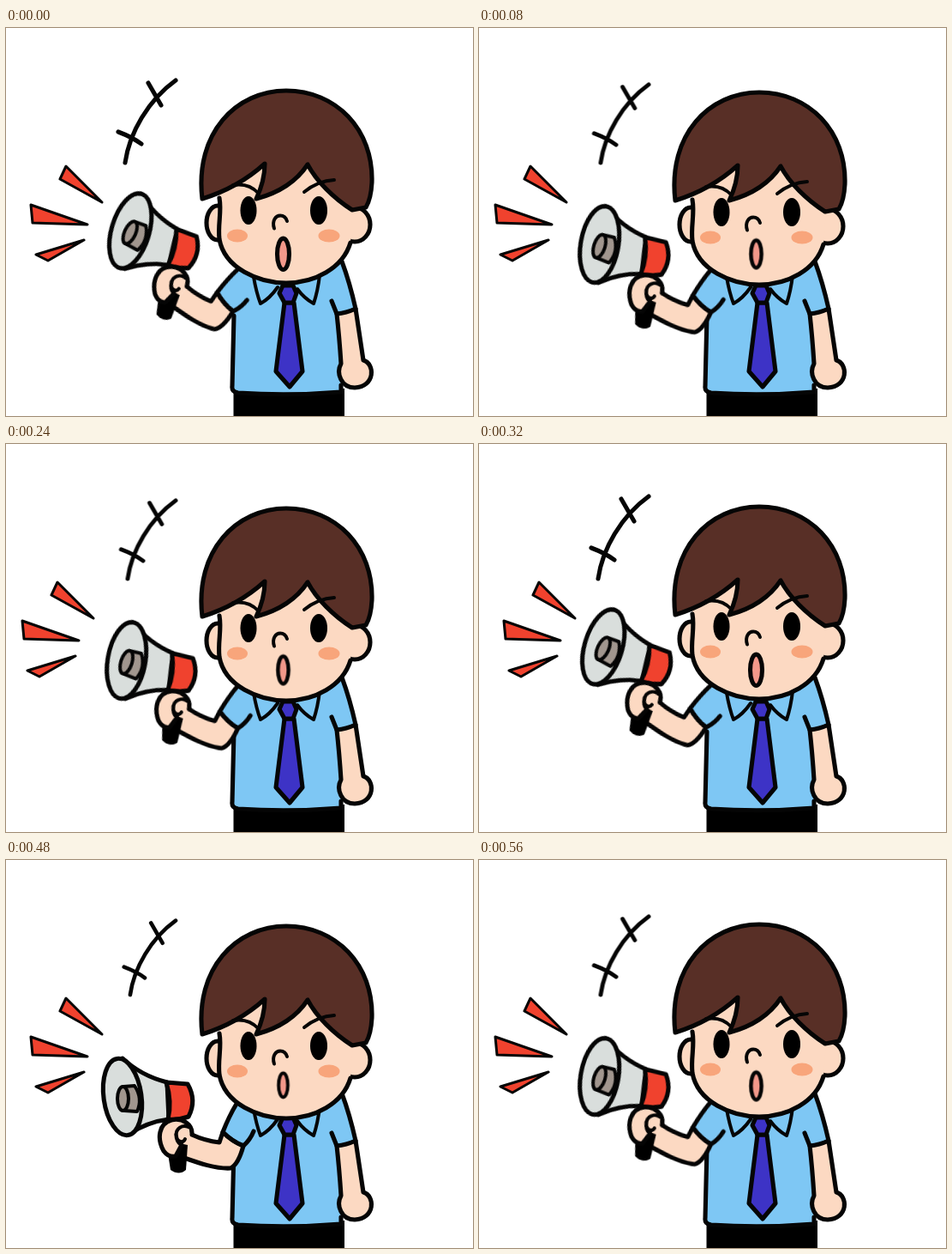
Recreate the animation shown at these times as an HTML page. Size 545x452 px, loop 640 ms.

```html
<!DOCTYPE html>
<html lang="en">
<head>
<meta charset="utf-8">
<title>Megaphone call</title>
<style>
  html, body { margin: 0; width: 100%; height: 100%; overflow: hidden; background: #fff; }
  svg { display: block; width: 545px; height: 452px; }

  .line { fill: none; stroke: #050505; stroke-width: 5.1; stroke-linecap: round; stroke-linejoin: round; }
  .thin { stroke-width: 4; }
  .fine { stroke-width: 3; }
  .skin { fill: #fcd9c2; }
  .shirt { fill: #7ec7f4; }
  .tie { fill: #3d33c6; }
  .hair { fill: #582f26; }
  .red { fill: #f0422e; }
  .horn { fill: #d9dedc; }
  .mic { fill: #a1968e; }
  .cheek { fill: #f8a57b; }
  .lips { fill: #f2988a; }

  /* Four hard-cut poses: high, middle, low, middle */
  .head, .arm, .rim, .mouth, .swoosh { animation: 320ms step-end infinite; }
  .head { animation-name: nod; }
  .arm { animation-name: swing; transform-origin: 279px 296.5px; }
  .rim { animation-name: tilt; transform-origin: 136px 276px; }
  .mouth { animation-name: shout; transform-origin: 323.5px 263px; }
  .swoosh { animation-name: shrink; transform-origin: 198px 157px; }
  .rays { animation: jump 160ms step-end infinite; }

  @keyframes nod {
    0% { transform: translateY(0); }
    25%, 75% { transform: translateY(2px); }
    50% { transform: translateY(4px); }
  }
  @keyframes swing {
    0% { transform: translate(-2px, -1px) rotate(16deg); }
    25%, 75% { transform: translate(-.5px, -1px) rotate(9.3deg); }
    50% { transform: rotate(0deg); }
  }
  @keyframes tilt {
    0%, 25%, 75% { transform: rotate(8.5deg); }
    50% { transform: rotate(0deg); }
  }
  @keyframes shout {
    0% { transform: scale(1); }
    25%, 75% { transform: scale(.88); }
    50% { transform: translateY(-1px) scale(.77); }
  }
  @keyframes shrink {
    0% { transform: scale(1); }
    25%, 75% { transform: scale(.95); }
    50% { transform: scale(.9); }
  }
  @keyframes jump {
    0% { transform: translateX(0); }
    50% { transform: translateX(-10px); }
  }
</style>
</head>
<body>
<svg viewBox="0 0 545 452">
  <g class="swoosh">
    <path class="line" d="M139 157C144 122 166 84 198 61M166 64L181 90M131 121Q147 127 158 135"/>
  </g>

  <g class="rays">
    <path class="line red fine" d="M70 161L63 176L112 203ZM29 206L31 227L95 229ZM35 264L49 271L91 247Z"/>
  </g>

  <g class="torso">
    <path d="M265.500 420H395V452H265.500Z"/>
    <path class="shirt" d="M268 280L392 272Q401 296 408 326L386 333L391 424Q330 429 271 425Q263 424 264 417L266 333Z"/>
    <path class="line" d="M266 335L264 417Q263 424 271 425Q330 429 391 424V416"/>
    <path class="line skin" d="M386 333Q389 360 391 391C385 402 391 419 407 419C431 418 431 391 417 387L408 327Q397 332 386 333Z"/>
    <path class="line" d="M380 318L386 333M392 272Q401 296 408 327"/>
  </g>

  <g class="arm">
    <path class="shirt" d="M267 288L253 317Q264 328 277 333L289 316L300 296L285 285Z"/>
    <path class="line skin" d="M217 320Q232 327 249 329L253 317Q264 328 277 333Q271 355 262 359C245 360 225 353 208 347"/>
    <path class="line" d="M269 284Q260 299 253 317Q264 328 277 333Q285 326 289 316"/>

    <g class="megaphone">
      <path class="line horn" d="M136 231Q157 251 188 259L190 302Q165 305 142 320Z"/>
      <path class="line red" d="M187 259L212 261Q223 280 213 299Q202 303 189 302Q194 282 187 259Z"/>
      <g class="rim">
        <ellipse class="line horn" cx="136" cy="276" rx="22" ry="45" transform="rotate(-8 136 276)"/>
        <path class="line mic thin" d="M137 264L150 263Q160 278 153 293L138 292Z"/>
        <ellipse class="line mic thin" cx="136.500" cy="278" rx="6.500" ry="14"/>
      </g>
    </g>

    <path class="skin" d="M195 310L218 318L209 347L200 340Z"/>
    <path d="M202 330L212 332L210 361Q202 368 192 361L189 342Z"/>
    <path class="line skin" d="M217 320C218 308 206 300 193 303C178 307 176 325 184 339Q190 347 198 345L205 332Q199 328 199 320"/>
    <path class="line skin thin" d="M215 312C206 307 197 313 199 322C200 329 207 330 209 325"/>
  </g>

  <g class="collar">
    <path class="line tie" d="M325 320L315 400L331 418L346 400L336 320Z"/>
    <path class="line tie" d="M323 300H335L339 309L335 320H325L319 309Z"/>
    <path class="line thin" d="M289 290Q292 308 297 321Q308 315 317 302M366 288Q364 306 359 321Q348 315 340 304"/>
  </g>

  <g class="head">
    <ellipse class="line skin" cx="247" cy="227" rx="13" ry="20"/>
    <ellipse class="line skin" cx="407" cy="229" rx="18" ry="20"/>
    <path class="skin" d="M249 150V246C255 280 295 297 327 297C360 297 393 280 402 250L405 210L400 150Z"/>
    <path class="line" d="M249 198C252 215 247 228 249 246C255 280 295 297 327 297C360 297 393 280 402 250"/>
    <path class="line hair" d="M229 199C220 122 269 73 327 73C385 73 429 118 427 180Q426 199 420 209L404 212C382 198 362 178 352 159Q333 188 292 199Q302 178 302 158Q271 186 229 199Z"/>
    <path class="line thin" d="M265 183Q283 180 294 192M348 191Q364 178 383 177"/>
    <ellipse cx="283" cy="212.500" rx="9.500" ry="16.500"/>
    <ellipse cx="365" cy="212.500" rx="10" ry="16.500"/>
    <g class="cheek">
      <ellipse cx="270" cy="242" rx="12" ry="7.500"/>
      <ellipse cx="377" cy="242" rx="12.500" ry="7.500"/>
    </g>
    <path class="line thin" d="M313 233.500C310 224 315 218.500 320 218.500Q326 218.500 328 225"/>
  </g>

  <g class="mouth">
    <ellipse class="line lips" cx="323.500" cy="263.300" rx="7" ry="18.200"/>
  </g>
</svg>
</body>
</html>
```
